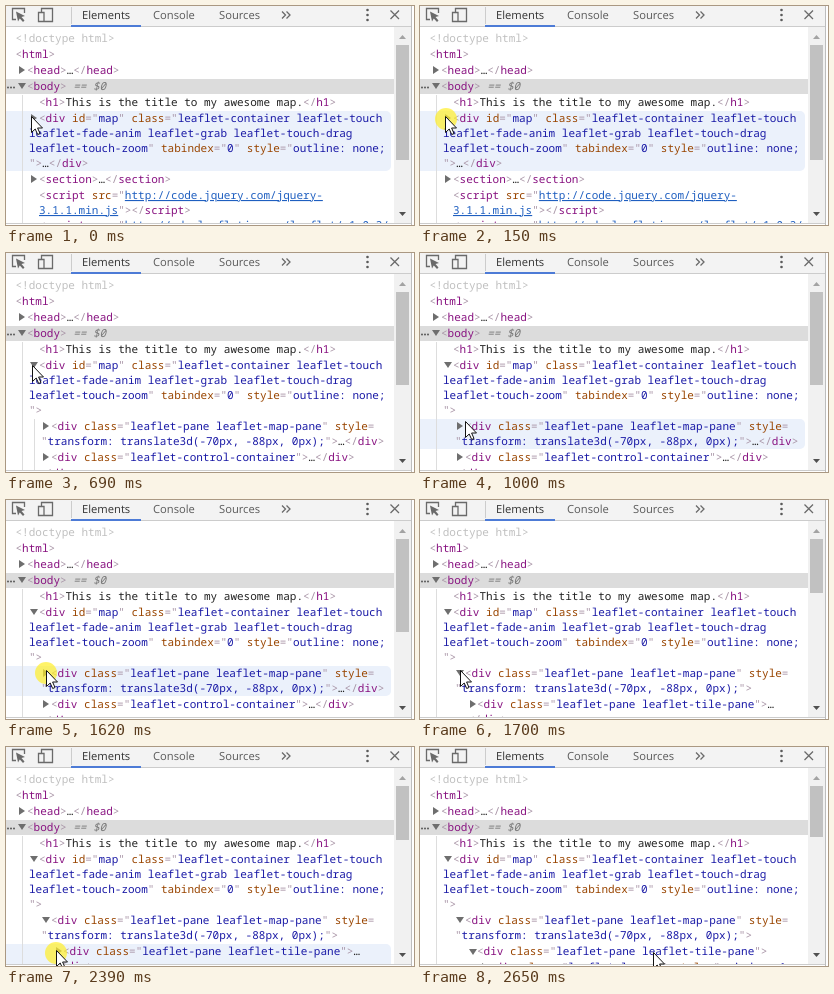
An HTML page that plays this animation: 408x219 px, repeating every 2.71 s.

```html
<!DOCTYPE html>
<html lang="en">
<head>
<meta charset="utf-8">
<title>Inspecting a map element</title>
<style>
html, body { margin: 0; width: 100%; height: 100%; overflow: hidden; background: #fff; }
svg { display: block; width: 408px; height: 219px; }
text { font: 11px "Noto Sans Mono", "Liberation Mono", monospace; fill: #222; text-rendering: geometricPrecision; }
text.b { fill: #a894a6; }
.t { fill: #881280; }
.n { fill: #994500; }
.v { fill: #1a1aa6; }
.x { fill: #222; }
.l { fill: #1f5fc0; text-decoration: underline; }
.g { fill: #c0c0c0; }
.s { fill: #777; font-style: italic; }
text.tab { font: 11.2px "Open Sans", "Noto Sans", sans-serif; fill: #5a5a5a; }
text.tab.on { fill: #333; }
.tri { fill: #6e6e6e; }
.hover { fill: #ebf1fb; }
.guide { fill: #ddd; }
.icon { fill: none; stroke: #6a6a6a; stroke-width: 1.3; }
.ring { fill: #ffee28; fill-opacity: .7; }

#cursor, #thumb, .show { animation: 2710ms step-end infinite; }
.show { visibility: hidden; }
#cursor { animation-name: move; }
#thumb { animation-name: shrink; }
#closed, #hoverMap { animation-name: closed; }
#open { animation-name: open; }
#mapGuide { animation-name: mapGuide; }
#paneClosed { animation-name: paneClosed; }
#paneOpen { animation-name: paneOpen; }
#tileClosed { animation-name: tileClosed; }
#tileOpen { animation-name: tileOpen; }
#hoverPane { animation-name: hoverPane; }
#hoverTile { animation-name: hoverTile; }
#click1 { animation-name: click1; }
#click2 { animation-name: click2; }
#click3 { animation-name: click3; }

@keyframes closed { 0% { visibility: visible } 8.487%, 100% { visibility: hidden } }
@keyframes open { 0% { visibility: hidden } 8.487%, 100% { visibility: visible } }
@keyframes mapGuide { 0% { visibility: hidden } 8.487% { visibility: visible } 36.9%, 100% { visibility: hidden } }
@keyframes paneClosed { 0% { visibility: hidden } 8.487% { visibility: visible } 62.731%, 100% { visibility: hidden } }
@keyframes paneOpen { 0% { visibility: hidden } 62.731%, 100% { visibility: visible } }
@keyframes tileClosed { 0% { visibility: hidden } 62.731% { visibility: visible } 88.561%, 100% { visibility: hidden } }
@keyframes tileOpen { 0% { visibility: hidden } 88.561%, 100% { visibility: visible } }
@keyframes hoverPane { 0% { visibility: hidden } 36.9% { visibility: visible } 62.731%, 100% { visibility: hidden } }
@keyframes hoverTile { 0% { visibility: hidden } 79.705% { visibility: visible } 88.561%, 100% { visibility: hidden } }
@keyframes click1 { 0% { visibility: hidden } 5.535% { visibility: visible } 8.487%, 100% { visibility: hidden } }
@keyframes click2 { 0% { visibility: hidden } 59.779% { visibility: visible } 62.731%, 100% { visibility: hidden } }
@keyframes click3 { 0% { visibility: hidden } 85.609% { visibility: visible } 88.561%, 100% { visibility: hidden } }
@keyframes shrink {
  0% { height: 115px }
  8.487% { height: 93px }
  62.731% { height: 54px }
  88.561%, 100% { height: 51px }
}
@keyframes move {
  0% { transform: translate(25px, 110px) }
  25.461% { transform: translate(26px, 112px) }
  28.413% { transform: translate(29px, 121px) }
  31.365% { transform: translate(36px, 140px) }
  34.317% { transform: translate(42px, 158px) }
  36.9% { transform: translate(45px, 168px) }
  39.483% { transform: translate(44px, 172px) }
  47.97% { transform: translate(40px, 170px) }
  79.705% { transform: translate(50px, 202px) }
  82.657% { transform: translate(50px, 203px) }
  91.513% { transform: translate(72px, 204px) }
  94.465% { transform: translate(150px, 206px) }
  97.786%, 100% { transform: translate(233px, 205px) }
}
</style>
</head>
<body>
<svg viewBox="0 0 408 219">
  <defs><clipPath id="panel"><rect y="21" width="388" height="196"/></clipPath></defs>
  <rect width="408" height="219" fill="#fff"/>

  <!-- toolbar -->
  <rect width="405" height="20" fill="#f3f3f3"/>
  <rect y="20" width="405" height="1" fill="#ccc"/>
  <rect x="65" y="19" width="70" height="2" fill="#4d7bd6"/>
  <path class="icon" d="M10 13.5H6.5V2.5H18.5V7"/>
  <path d="M10 5.5L19 10 15.5 11 18.5 14.5 17 16 13.8 12.5 12 15.5z" fill="#6a6a6a"/>
  <path class="icon" d="M35.5 6V2.5H46.5V15.5H38M32.5 6.500H38V15.5H32.5z"/>
  <rect x="65" y="1" width="1" height="17" fill="#ccc"/>
  <text class="tab on" x="76" y="13">Elements</text>
  <text class="tab" x="147" y="13">Console</text>
  <text class="tab" x="213" y="13">Sources</text>
  <path class="icon" d="M276 5.5L279.5 9 276 12.5M280.5 5.5L284 9 280.5 12.5"/>
  <g fill="#5a5a5a"><circle cx="361.5" cy="4" r="1.3"/><circle cx="361.5" cy="9" r="1.3"/><circle cx="361.5" cy="14" r="1.3"/></g>
  <path class="icon" d="M384.5 4.5L393 13M393 4.5L384.5 13"/>

  <g clip-path="url(#panel)">
    <rect y="73" width="388" height="15" fill="#dcdcdc"/>
    <rect class="hover show" id="hoverMap" x="-6" y="105" width="391" height="60" rx="5"/>
    <rect class="hover show" id="hoverPane" x="-6" y="166" width="391" height="30" rx="5"/>
    <rect class="hover show" id="hoverTile" x="-6" y="197" width="391" height="30" rx="5"/>
    <rect class="guide" x="16" y="89" width="1" height="128"/>
    <rect class="guide show" id="mapGuide" x="28" y="166" width="1" height="51"/>
    <g fill="#5a5a5a"><circle cx="2" cy="81.5" r="1"/><circle cx="5" cy="81.5" r="1"/><circle cx="8" cy="81.5" r="1"/></g>
    <g id="base"></g>
    <g id="closed" class="show"></g>
    <g id="open" class="show"></g>
    <g id="paneClosed" class="show"></g>
    <g id="paneOpen" class="show"></g>
    <g id="tileClosed" class="show"></g>
    <g id="tileOpen" class="show"></g>
  </g>

  <!-- scrollbar -->
  <rect x="388" y="21" width="17" height="196" fill="#f1f1f1"/>
  <path d="M393 33L396.5 29 400 33z" fill="#a3a3a3"/>
  <path d="M393 206L396.5 210 400 206z" fill="#505050"/>
  <rect id="thumb" x="390" y="39" width="13" height="115" fill="#c1c1c1"/>
  <rect x="405" width="1" height="219" fill="#bdbdbd"/>
  <rect y="217" width="405" height="1" fill="#ccc"/>

  <circle id="click1" class="ring show" cx="26" cy="113" r="11"/>
  <circle id="click2" class="ring show" cx="40" cy="173" r="11"/>
  <circle id="click3" class="ring show" cx="50" cy="206" r="11"/>
  <path id="cursor" d="M.5 .5V16.5L4.2 13 6.7 18.5 9 17.5 6.6 12H11.5z" fill="#fff" stroke="#111"/>
</svg>
<script>
// {k text} gives the text class k; plain text is markup punctuation.
function line(x, y, src) {
  const body = src.replace(/</g, '&lt;').replace(/>/g, '&gt;')
    .replace(/\{(\w) ([^}]*)\}/g, '<tspan class="$1">$2</tspan>');
  return `<text class="b" x="${x}" y="${y}">${body}</text>`;
}
const right = (x, y) => `<path class="tri" d="M${x} ${y - 4}l6 4-6 4z"/>`;
const down = (x, y) => `<path class="tri" d="M${x} ${y - 3}h8l-4 6z"/>`;
const fill = (id, ...parts) => { document.getElementById(id).innerHTML = parts.join(''); };
const div = '<{t div} {n class}="';
const end = '</{t div}>';
const more = '{x …}';

fill('base',
  line(9.5, 36, '{g <!doctype html>}'),
  line(9.5, 52, '<{t html}>'),
  right(13, 64), line(21, 68, `<{t head}>${more}</{t head}>`),
  down(12, 80), line(21, 84, '<{t body}> {s == $0}'),
  line(33, 100, '<{t h1}>{x This is the title to my awesome map.}</{t h1}>'),
  line(33, 116, '<{t div} {n id}="{v map}" {n class}="{v leaflet-container leaflet-touch}'),
  line(23, 131, '{v leaflet-fade-anim leaflet-grab leaflet-touch-drag}'),
  line(23, 146, '{v leaflet-touch-zoom}" {n tabindex}="{v 0}" {n style}="{v outline: none;}'));

fill('closed',
  right(25, 112), line(23, 161, `">${more}${end}`),
  right(25, 173), line(33, 177, `<{t section}>${more}</{t section}>`),
  line(33, 193, '<{t script} {n src}="{l http://code.jquery.com/jquery-}'),
  line(33, 208, '{l 3.1.1.min.js}"></{t script}>'),
  line(33, 223, '<{t script} {n src}="{l http://cdn.leafletjs.com/leaflet/v1.0.3/}'));

fill('open',
  down(24, 112), line(23, 161, '">'),
  line(45, 177, div + '{v leaflet-pane leaflet-map-pane}" {n style}='),
  line(35, 192, '"{v transform: translate3d(-70px, -88px, 0px);}">'));

fill('paneClosed',
  right(37, 173), line(35 + 45 * 6.6, 192, more + end),
  right(37, 204), line(45, 208, div + `{v leaflet-control-container}">${more}${end}`),
  line(33, 224, end));

fill('paneOpen',
  down(36, 173), line(57, 208, div + '{v leaflet-pane leaflet-tile-pane}">'));

fill('tileClosed',
  right(50, 204), line(57 + 44 * 6.6, 208, more), line(48, 223, end));

fill('tileOpen',
  down(49, 205), right(62, 220),
  line(69, 224, div + '{v leaflet-layer }" {n style}="{v z-index: 1;}'));
</script>
</body>
</html>
```
